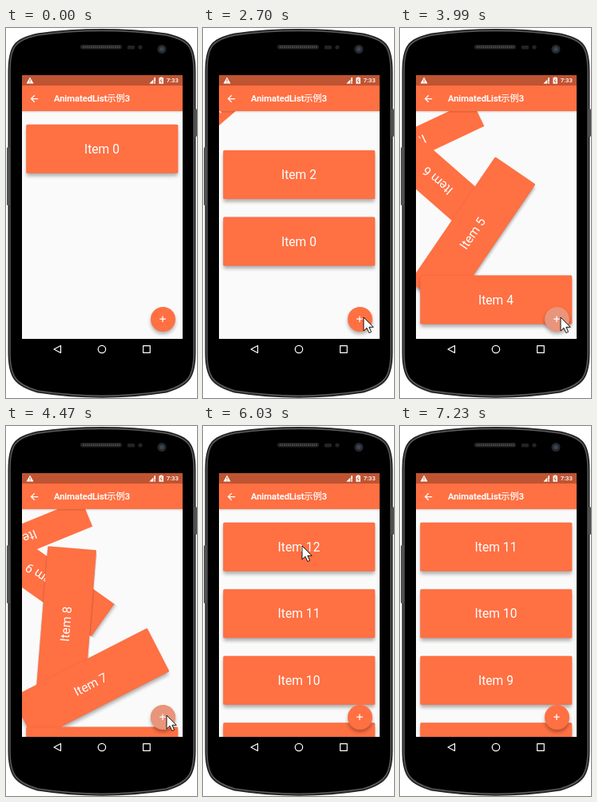
Recreate the animation shown at these times as an HTML page. Size 239 px wide and 463 px high, loop 7350 ms.

```html
<!DOCTYPE html>
<html lang="zh">
<head>
<meta charset="utf-8">
<title>AnimatedList</title>
<style>
  html, body { margin: 0; width: 100%; height: 100%; overflow: hidden; background: #fff; }
  #stage { position: relative; width: 239px; height: 463px; overflow: hidden;
    font-family: Roboto, "Noto Sans CJK SC", "Noto Sans CJK", sans-serif; color: #fff; }
  #stage > * { position: absolute; }
  svg { left: 0; top: 0; overflow: visible; }
  #list { left: 20px; top: 103px; width: 201px; height: 286px; overflow: hidden; background: #fafafa; }
  .card { position: absolute; left: -94.75px; top: -30.5px; width: 189.5px; height: 61px;
    line-height: 61px; text-align: center; font-size: 15.7px; background: #ff7043; border-radius: 1.5px; }
  #status { left: 20px; top: 59px; width: 201px; height: 13px; background: #bf5432; }
  #bar { left: 20px; top: 72px; width: 201px; height: 31.5px; background: #ff7043;
    box-shadow: 0 1px 2px rgba(0,0,0,.18); clip-path: inset(0 0 -5px 0); }
  #title { left: 60px; top: 80px; font-size: 11.17px; line-height: 17px; font-weight: 500;
    white-space: nowrap; -webkit-text-stroke: .2px #fff; }
  #time { right: 23px; top: 60px; font-size: 7.8px; line-height: 12px; font-weight: 500; }
  #fab { left: 180.5px; top: 348.5px; width: 31px; height: 31px; border-radius: 50%; background: #ff7043;
    box-shadow: 0 3px 4px rgba(0,0,0,.3); overflow: hidden; }
  #press { width: 100%; height: 100%; border-radius: 50%; background: #c8c8c8; opacity: 0; }
</style>
</head>
<body>
<div id="stage">
  <svg width="239" height="463">
    <defs>
      <path id="body" d="M5 55C5 24 11 15 40 9C92 2 148 2 200 9C229 15 235 24 235 55V406C235 436 228 446 200 454C148 462 92 462 40 454C12 446 5 436 5 406Z"/>
    </defs>
    <use href="#body" stroke="#222" stroke-width="5"/>
    <use href="#body" stroke="#5a5a5a" stroke-width="1.5"/>
    <rect x="1" y="149" width="4" height="73" rx="1.5" fill="#505050"/>
    <rect x="235.5" y="101" width="3.5" height="35" rx="1.5" fill="#505050"/>
    <rect x="93" y="21" width="52" height="5.5" rx="2.7" fill="#242424"/>
    <path d="M96 23.7H143" stroke="#484848" stroke-width="2.5" stroke-dasharray="1.5 1"/>
    <g fill="#242424"><rect x="152" y="22" width="9" height="4.5" rx="1"/><circle cx="168" cy="24" r="2.6"/></g>
    <circle cx="195" cy="26.5" r="5.5" fill="#25282d"/>
    <circle cx="195" cy="26.5" r="2.7" fill="#3b4552"/>
    <g fill="none" stroke="#fff" stroke-width="1.2" stroke-linejoin="round">
      <path d="M68.5 397.5V406.5L60 402Z"/><circle cx="120" cy="402" r="4.7"/>
      <rect x="171.7" y="397.7" width="8.6" height="8.6"/>
    </g>
  </svg>
  <div id="list"></div>
  <div id="status"></div>
  <div id="bar"></div>
  <div id="title">AnimatedList示例3</div>
  <div id="time">7:33</div>
  <div id="fab"><div id="press"></div></div>
  <svg width="239" height="463">
    <path d="M30 61.5L34.5 69.5H25.5Z" fill="#fff"/>
    <path d="M30 64.2V66.8M30 67.5V68.5" stroke="#bf5432"/>
    <path d="M187 62V69.5H179.5Z" fill="#fff" opacity=".4"/>
    <path d="M184 65V69.5H179.5ZM185.5 62H187V67H185.5ZM185.5 68H187V69.5H185.5Z" fill="#fff"/>
    <path d="M193 61.5H195.5V62.3H197V69.8H191.5V62.3H193Z" fill="#fff"/>
    <path d="M194.8 63.3L193 66.4H195.3L194 68.8" fill="none" stroke="#bf5432" stroke-width=".8"/>
    <g fill="none" stroke="#fff" stroke-width="1.25">
      <path d="M40.2 88.5H31.5M35.8 84.2L31.5 88.5L35.8 92.8"/>
      <path d="M192.2 364.2H199.8M196 360.4V368"/>
    </g>
    <path id="cursor" d="M0 0V17L4 13.3L6.8 19.5L9.6 18.3L6.9 12.3H12.2Z" fill="#fff" stroke="#000" stroke-width=".9"/>
  </svg>
</div>
<script>
const LOOP = 7350, STEP = 30, GROW = 970, REMOVE_AT = 6260;
const ROW = 83.5, CARD = 61, TOP = 6, MID = 100.25;
const SLIDE_X = 189.5, SLIDE_Y = .55;

// insertion time of each item, newest first
const taps = [[12, 4386], [11, 4226], [10, 4045], [9, 3890], [8, 3730], [7, 3573],
  [6, 3394], [5, 3170], [4, 2957], [3, 2325], [2, 865], [0, -GROW]];

// pointer: time, x, y
const track = [[390, 234, 376], [690, 201, 362], [4590, 201, 362], [4860, 219.5, 370],
  [4980, 219.5, 370], [5280, 203, 372], [5430, 200, 366], [6030, 124, 150],
  [6300, 124, 150], [6660, 223, 185]];

const $ = id => document.getElementById(id);
const clamp = v => Math.max(0, Math.min(1, v));
const ease = v => v * v * (3 - 2 * v);

const items = taps.map(([n, at]) => {
  const el = document.createElement('div');
  el.className = 'card';
  el.textContent = 'Item ' + n;
  $('list').append(el);
  return { n, at, el };
});

// The row grows and clips its card; new rows also slide in and make one turn.
function drawList(t) {
  let y = TOP;
  for (const { n, at, el } of items) {
    const leaving = n === 12 && t > REMOVE_AT;
    const v = clamp(leaving ? 1 - (t - REMOVE_AT) / GROW : (t - at) / GROW);
    const height = ROW * v, slide = leaving ? 0 : 1 - v;
    const turn = leaving ? 0 : 2 * Math.PI * v;
    const cx = MID - SLIDE_X * slide;
    const cy = y + height / 2 - SLIDE_Y * height * slide;
    el.style.display = v > 0 ? '' : 'none';
    el.style.transform = `translate(${cx}px,${cy}px) rotate(${turn}rad)`;
    el.style.clipPath = `inset(${(CARD - height) / 2}px -8px)`;
    // the light stays above the screen while the card turns
    const sx = 4 * Math.sin(turn), sy = 4 * Math.cos(turn);
    el.style.boxShadow = `${sx}px ${sy}px 4px -.5px rgba(0,0,0,.3), 0 0 1px rgba(0,0,0,.12)`;
    y += height;
  }
}

function drawPress(t) {
  const glow = taps.map(([, at]) => {
    const d = t - at;
    return d < 0 ? clamp(1 + d / 100) : clamp(1 - (d - 100) / 90);
  });
  $('press').style.opacity = .42 * Math.max(...glow);
}

function drawCursor(t) {
  const i = track.findIndex(p => p[0] > t);
  const shown = i > 0;
  $('cursor').style.display = shown ? '' : 'none';
  if (!shown) return;
  const [a, b] = [track[i - 1], track[i]];
  const k = ease((t - a[0]) / (b[0] - a[0]));
  const at = j => a[j] + (b[j] - a[j]) * k;
  $('cursor').setAttribute('transform', `translate(${at(1)} ${at(2)})`);
}

const start = performance.now();
function frame() {
  const now = (performance.now() - start) % LOOP;
  const t = now - now % STEP;
  drawList(t);
  drawPress(t);
  drawCursor(t);
  requestAnimationFrame(frame);
}
frame();
</script>
</body>
</html>
```
